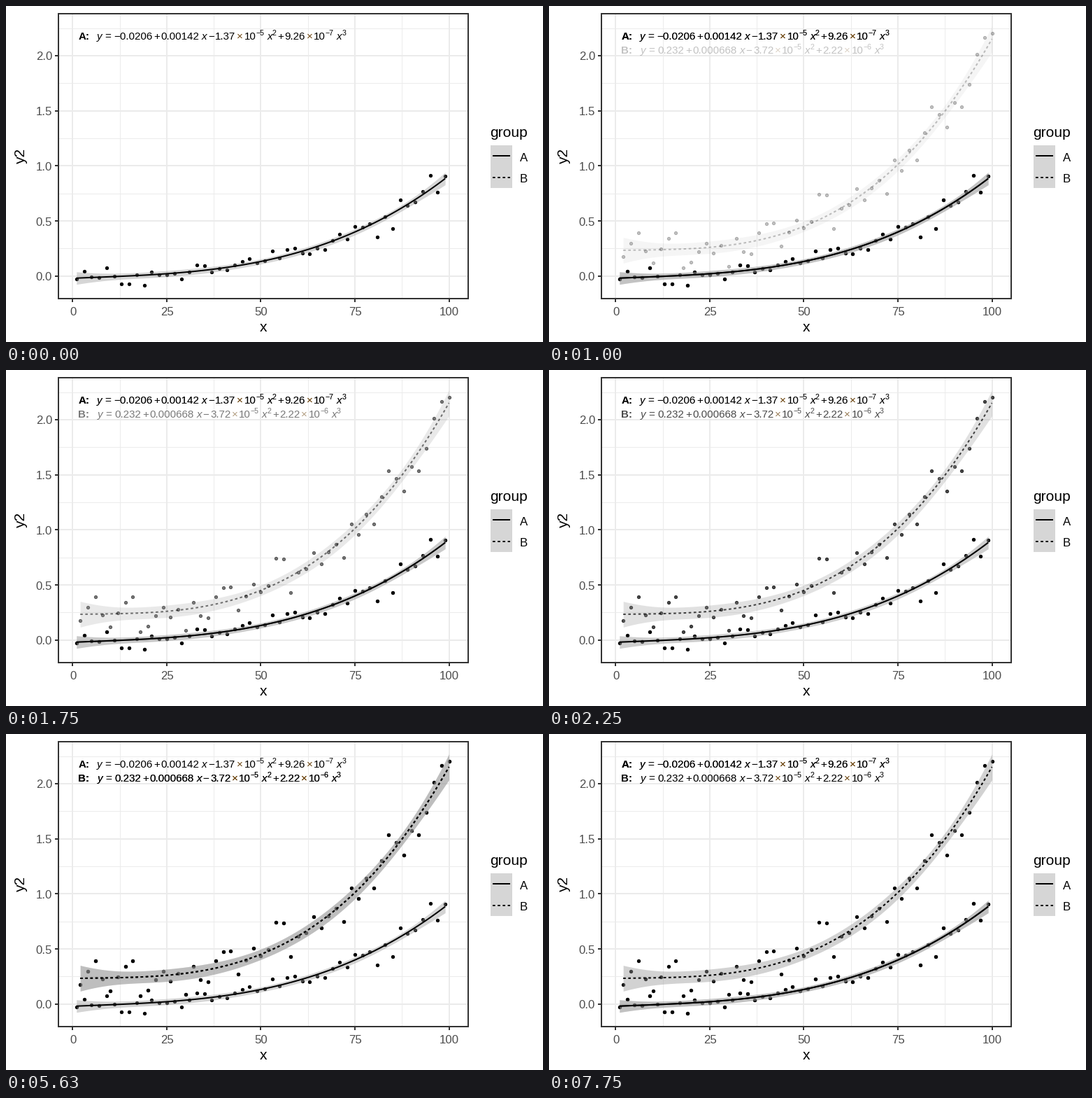
Write a matplotlib script that moves like this. It is 768x480 px and loops after 8 s.

```python
import math

import numpy as np
import matplotlib.pyplot as plt
from matplotlib.animation import FuncAnimation
from matplotlib.patches import Rectangle

W, H, DPI = 768, 480, 100
PT = 72 / DPI  # points per pixel
STEP, N_FRAMES = 125, 64

LEFT, RIGHT, TOP, BOTTOM = 75, 661, 11, 418
GRID, DARK, GREY, BAND = "#EBEBEB", "#333333", "#4D4D4D", "#999999"
DASHES = (0, (1.8, 1.8))

plt.rcParams["font.family"] = "Liberation Sans"

fig = plt.figure(figsize=(W / DPI, H / DPI), dpi=DPI, facecolor="white")
ax = fig.add_axes([0, 0, 1, 1])
ax.set_xlim(0, W)
ax.set_ylim(H, 0)
ax.axis("off")


def px(x):
    return 95.4 + 5.381 * np.asarray(x)


def py(y):
    return 385.7 - 157.4 * np.asarray(y)


def line(xs, ys, color="black", width=2, **kw):
    return ax.plot(xs, ys, color=color, lw=width * PT,
                   solid_capstyle="butt", **kw)[0]


def text(x, y, s, size, color="black", **kw):
    return ax.text(x, y, s, fontsize=size * PT, color=color,
                   va="baseline", **kw)


def normals(n, seed):
    """Normal deviates: LCG-seeded Mersenne Twister plus inversion."""
    key = []
    for i in range(51 + 624):
        seed = (69069 * seed + 1) % 2**32
        if i > 50:
            key.append(seed)
    rng = np.random.RandomState()
    rng.set_state(("MT19937", np.array(key, dtype=np.uint32), 624))
    z = np.linspace(-5, 5, 4001)
    cdf = [0.5 * (1 + math.erf(v / math.sqrt(2))) for v in z]
    return np.interp(rng.random_sample(n), cdf, z)


def draw_panel():
    for i in range(4):
        x = px(12.5 + 25 * i)
        line([x, x], [TOP, BOTTOM], GRID, 1, zorder=0)
    for i in range(5):
        y = py(0.25 + 0.5 * i)
        line([LEFT, RIGHT], [y, y], GRID, 1, zorder=0)
    for i in range(5):
        x, y = px(25 * i), py(0.5 * i)
        line([x, x], [TOP, BOTTOM], GRID, zorder=0.5)
        line([LEFT, RIGHT], [y, y], GRID, zorder=0.5)
        line([x, x], [BOTTOM, BOTTOM + 5], DARK)
        line([LEFT - 5, LEFT], [y, y], DARK)
        text(x + 0.3, 442, f"{25 * i}", 16.8, GREY, ha="center")
        text(66, y + 6.5, f"{0.5 * i:.1f}", 16.8, GREY, ha="right")
    ax.add_patch(Rectangle((LEFT, TOP), RIGHT - LEFT, BOTTOM - TOP, fill=False,
                           ec=DARK, lw=2 * PT, zorder=8))
    text(368, 465, "x", 21, ha="center")
    text(27, 225, "y2", 21, rotation=90, rotation_mode="anchor")


def draw_legend():
    text(692.5, 187, "group", 21)
    ax.add_patch(Rectangle((693, 199), 31, 61, fc="#D6D6D6", lw=0))
    for name, y, style in (("A", 214, "-"), ("B", 245, DASHES)):
        line([696, 721], [y, y], ls=style)
        text(735, y + 7.5, name, 16.8)


# Advance widths in em; digits are the default.
EM = {".": 0.278, "_": 0.278, "x": 0.5, "y": 0.5} | dict.fromkeys("+−=×", 0.584)


def equation(label, formula, x, base):
    """Set tokens one after another: _ is a space, ^ raises a token."""
    parts = [text(103.5, base, label, 15, weight="bold")]
    for token in formula.split():
        raised = token[0] == "^"
        token = token.lstrip("^")
        size = 10.5 if raised else 15.1
        gap = 1.5 if token in ("+", "−", "×") else 0
        x += gap
        if token != "_":
            parts.append(text(
                x, base - 6.5 * raised, token, size,
                color="#6E4712" if token == "×" else "black",
                style="italic" if token in "xy" else "normal"))
        x += gap + size * sum(EM.get(c, 0.556) for c in token)
    return parts


class Layer:
    """One copy of a group: points, band, curve and formula."""

    def __init__(self, x, y, style, *words):
        self.points = ax.scatter(px(x), py(y), s=(4.3 * PT) ** 2, c="black",
                                 edgecolors="black", linewidths=PT, zorder=3)
        xs = np.linspace(x[0], x[-1], 80)
        mid, half = self.cubic(x, y, xs)
        self.band = ax.fill_between(px(xs), py(mid - half), py(mid + half),
                                    color=BAND, lw=0, zorder=4)
        self.curve = line(px(xs), py(mid), ls=style, zorder=5)
        self.words = equation(*words)

    @staticmethod
    def cubic(x, y, xs):
        """Cubic fit at xs and the half width of its 95% band."""
        X, Q = (np.vander((v - 50) / 50, 4) for v in (x, xs))
        inv = np.linalg.inv(X.T @ X)
        beta = inv @ X.T @ y
        resid = y - X @ beta
        s2 = resid @ resid / (len(x) - 4)
        return Q @ beta, 2.013 * np.sqrt(s2 * np.sum(Q @ inv * Q, axis=1))

    def fade(self, a):
        self.band.set_alpha(0.4 * a)
        for art in (self.points, self.curve, *self.words):
            art.set_alpha(a)
        for art in (self.band, self.points, self.curve, *self.words):
            art.set_visible(a > 0)


x = np.arange(1, 101)
y = x + x**2 + x**3 + normals(100, 4321) * np.mean(x**3) / 4
y /= y.max()

GROUP_A = (x[::2], y[::2], "-", "A:",
           "y _ = _ −0.0206 + 0.00142 _ x − 1.37 × 10 ^−5 _ x ^2"
           " + 9.26 × 10 ^−7 _ x ^3", 129.5, 48)
GROUP_B = (x[1::2], 2 * y[1::2] + 0.2, DASHES, "B:",
           "y _ = _ 0.232 + 0.000668 _ x − 3.72 × 10 ^−5 _ x ^2"
           " + 2.22 × 10 ^−6 _ x ^3", 131, 68)

draw_panel()
draw_legend()
a_main, a_extra = Layer(*GROUP_A), Layer(*GROUP_A)
b_main, b_extra = Layer(*GROUP_B), Layer(*GROUP_B)

CHANGES = [0, *range(500, 1251, 125), *range(1500, 3001, 250),
           5625, 6125, 6750, 7250, 7750]
FADE = 2625


def update(i):
    t = max(c for c in CHANGES if c <= i * STEP)
    if t < 500:
        levels = 1, 0, 0, 0
    elif t < 5625:
        p = min(1, (t - 375) / FADE)
        levels = 1, 1 - p, p, 0
    else:
        p = (t - 5500) / FADE
        levels = 1, p, 1, 1 - p
    for layer, level in zip((a_main, a_extra, b_main, b_extra), levels):
        layer.fade(level)
    return []


anim = FuncAnimation(fig, update, frames=N_FRAMES, interval=STEP,
                     repeat=True, repeat_delay=0, blit=False)
plt.show()
```
